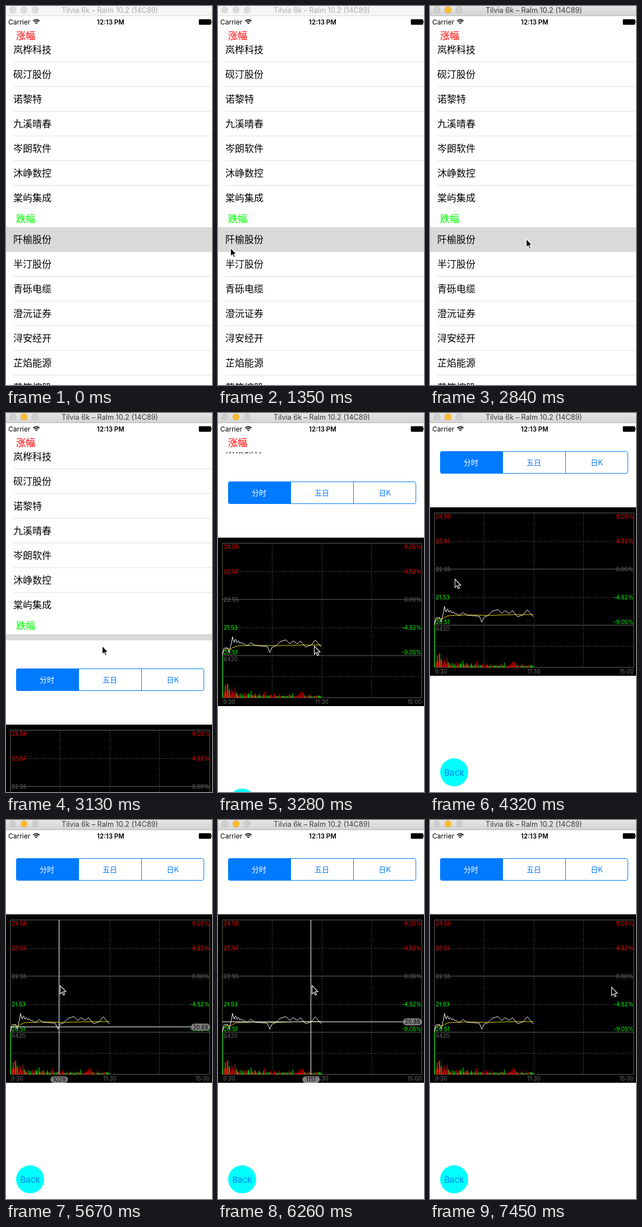
An HTML page with a canvas for the animation above (8 s loop, 367 px wide and 675 px high).

```html
<!DOCTYPE html>
<html lang="zh-CN">
<head>
<meta charset="utf-8">
<title>Stock list</title>
<style>
html, body { margin: 0; width: 100%; height: 100%; overflow: hidden; background: #fff; }
canvas { display: block; width: 367px; height: 675px; }
</style>
</head>
<body>
<canvas id="stage"></canvas>
<script>
const W = 367, H = 675, LOOP = 8000;
const canvas = document.getElementById('stage');
const dpr = window.devicePixelRatio || 1;
canvas.width = W * dpr;
canvas.height = H * dpr;
const ctx = canvas.getContext('2d');

const LATIN = 'Inter, "Liberation Sans", sans-serif';
const CJK = '"Noto Sans CJK SC", "Noto Sans CJK", "Noto Sans CJK JP", sans-serif';
const SMALL = '10px ' + LATIN, ROW = '17px ' + CJK;
const BLUE = '#007aff', RED = '#ff0000', GREEN = '#00ff00', GREY = '#6a6a6a';

const risers = ['岚桦科技', '砚汀股份', '诺黎特', '九溪晴春', '岑朗软件', '沐峥数控', '棠屿集成'];
const fallers = ['阡榆股份', '半汀股份', '青砾电缆', '澄沅证券', '浔安经开', '芷焰能源', '苇笙控股'];

// The screen updates in ticks; tick 0 is the moment the pointer enters.
const TICK = 148.75, FIRST = 1350, SLACK = 6;
const ACTIVE = 10, OPEN = 12, PRESS = 24, RELEASE = 39;
const pointerPath = [
  [0, 22, 430], [6, 171, 414], [16, 171, 414], [20, 44, 295], [25, 44, 295],
  [29, 96, 294], [39, 273, 294], [40, 273, 294], [41, 323, 297]
];

// Turning points of the price line.
const turns = [
  [8, 377], [10, 365], [17, 364], [20, 373], [25, 349], [32, 352], [46, 357], [53, 361],
  [58, 355], [66, 360], [88, 362], [92.5, 373], [95.5, 364], [103, 361], [111, 353],
  [121, 350], [128, 357], [134, 352], [141, 357], [147, 352], [156, 363], [167, 359],
  [173, 350], [183, 362]
];
const MINUTE = 177.5 / 120, LEFT = 8;

function lerp(a, b, k) { return a + (b - a) * k; }

// Linear interpolation of rows [position, value, ...] at p.
function along(rows, p) {
  let i = 0;
  while (i < rows.length - 1 && rows[i + 1][0] <= p) i++;
  const a = rows[i], b = rows[i + 1] || a;
  const k = b === a ? 0 : (p - a[0]) / (b[0] - a[0]);
  return a.slice(1).map((v, j) => lerp(v, b[j + 1], k));
}

function priceAt(x) {
  const d = x - 26;
  const ripple = d > -2 ? 5 * Math.exp(-d / 12) * Math.cos(d * Math.PI * 2 / 5.3) : 0;
  return along(turns, x)[0] - ripple;
}

function rng(seed) {
  return () => (seed = (seed * 16807) % 2147483647) / 2147483647;
}

// One entry per traded minute, with a volume-weighted average price.
function trade() {
  const rand = rng(77);
  let volume = 0, value = 0;
  return Array.from({ length: 120 }, (_, m) => {
    const x = LEFT + m * MINUTE, y = priceAt(x);
    const noise = rand();
    const h = m ? (5 + 21 * Math.exp(-m / 14)) * (0.25 + 0.75 * noise) + 6 * noise ** 8 : 75;
    const weight = m ? h : 8;
    volume += weight;
    value += weight * y;
    return { x, y, h, mean: value / volume, color: m && rand() < 0.55 ? RED : GREEN };
  });
}
const minutes = trade();

function text(str, x, y, font, color, align = 'left') {
  ctx.font = font;
  ctx.fillStyle = color;
  ctx.textAlign = align;
  ctx.fillText(str, x, y);
}

function box(x, y, w, h, color) {
  ctx.fillStyle = color;
  ctx.fillRect(x, y, w, h);
}

function disc(x, y, r, color) {
  ctx.fillStyle = color;
  ctx.beginPath();
  ctx.arc(x, y, r, 0, 7);
  ctx.fill();
}

function path(points, color, width = 1) {
  ctx.strokeStyle = color;
  ctx.lineWidth = width;
  ctx.beginPath();
  points.forEach(([x, y]) => ctx.lineTo(x, y));
  ctx.stroke();
}

function frameBox(x, y, w, h, r, color) {
  ctx.strokeStyle = color;
  ctx.lineWidth = 1;
  ctx.beginPath();
  ctx.roundRect(x + 0.5, y + 0.5, w - 1, h - 1, r);
  ctx.stroke();
}

function pill(x, y, w, h, label) {
  ctx.fillStyle = '#808080';
  ctx.beginPath();
  ctx.roundRect(x, y, w, h, h / 2);
  ctx.fill();
  text(label, x + w / 2, y + h / 2 + 3.7, SMALL, '#000', 'center');
}

function titleBar(active) {
  const g = ctx.createLinearGradient(0, 0, 0, 18);
  g.addColorStop(0, active ? '#e6e6e6' : '#f6f6f6');
  g.addColorStop(1, active ? '#d2d2d2' : '#f4f4f4');
  box(0, 0, W, 18, g);
  box(0, 17, W, 1, active ? '#b8b8b8' : '#dadada');
  [12, 32, 52].forEach((x, i) => {
    const lit = active && i === 1;
    disc(x, 7, 6, lit ? '#e0a123' : active ? '#bcbcbc' : '#d0d0d0');
    disc(x, 7, 5.3, lit ? '#fdbe2e' : active ? '#cecece' : '#dcdcdc');
  });
  text('Tilvia 6k – Ralm 10.2 (14C89)', 185, 12, '12.7px ' + LATIN,
    active ? '#3c3c3c' : '#ababab', 'center');
}

function statusBar() {
  text('Carrier', 4, 32.5, '12px ' + LATIN, '#000');
  ctx.strokeStyle = '#000';
  ctx.lineWidth = 1.7;
  for (const r of [4.6, 7.6]) {
    ctx.beginPath();
    ctx.arc(54, 32, r, -Math.PI * 0.76, -Math.PI * 0.24);
    ctx.stroke();
  }
  ctx.fillStyle = '#000';
  ctx.beginPath();
  ctx.moveTo(54, 32.5);
  ctx.arc(54, 32, 2.4, -Math.PI * 0.78, -Math.PI * 0.22);
  ctx.fill();
  text('12:13 PM', 186.5, 32.5, '600 11.5px ' + LATIN, '#000', 'center');
  frameBox(343, 23, 23, 11, 2, '#8a8a8a');
  box(344, 24, 21, 9, '#000');
  box(366, 26, 1, 4, '#555');
}

function rows(names, top, chosen) {
  names.forEach((name, i) => {
    const y = top + i * 44;
    if (i === chosen) box(0, y, W, 44, '#d9d9d9');
    else if (i < names.length - 1) box(13, y + 43, W - 13, 1, '#e0e0e2');
    text(name, 13, y + 28, ROW, '#000');
  });
}

function list() {
  rows(risers, 56, -1);
  rows(fallers, 394, 0);
  text('涨幅', 18, 59.4, ROW, RED);
  text('跌幅', 18, 385.4, ROW, GREEN);
}

function segments() {
  ctx.save();
  ctx.beginPath();
  ctx.roundRect(18, 68, 335, 40, 4);
  ctx.clip();
  box(18, 68, 112, 40, BLUE);
  box(241, 68, 1, 40, BLUE);
  ctx.restore();
  frameBox(18, 68, 335, 40, 3.5, BLUE);
  ['分时', '五日', '日K'].forEach((s, i) =>
    text(s, 73 + i * 112, 93, '13px ' + CJK, i ? BLUE : '#fff', 'center'));
}

function grid() {
  box(0, 168, W, 300, '#000');
  for (const y of [178, 278, 378, 453]) path([[8, y], [363, y]], '#666');
  for (const x of [8, 363]) path([[x, 178], [x, 453]], '#666');
  ctx.setLineDash([1, 3]);
  for (let i = 1; i < 4; i++) {
    const x = Math.round(LEFT + i * 88.75) - 0.5;
    path([[x, 178], [x, 453]], '#858585');
  }
  for (const y of [228, 328, 415]) path([[8, y + 0.5], [363, y + 0.5]], '#858585');
  ctx.setLineDash([]);
}

function curves() {
  for (const { x, h, color } of minutes) box(x, 453 - h, 1, h, color);
  path(minutes.map(d => [d.x, d.mean]), '#f0e800');
  path(minutes.map(d => [d.x, d.y]), '#fff');
}

function axisLabels() {
  for (let i = 0; i < 5; i++) {
    const color = i < 2 ? RED : i > 2 ? GREEN : GREY;
    const y = [188, 232, 282, 332, 376][i];
    text((24.59 - i * 1.02).toFixed(2), 10, y, SMALL, color);
    text(((2 - i) * 102 / 22.55).toFixed(2) + '%', 362.5, y, SMALL, color, 'right');
  }
  text('6420', 10, 388, SMALL, GREY);
  text('9:30', 9, 464, SMALL, GREY);
  text('11:30', 185, 464, SMALL, GREY, 'center');
  text('15:00', 363, 464, SMALL, GREY, 'right');
}

function crosshair(cx) {
  const m = Math.max(0, Math.min(minutes.length - 1, Math.floor((cx - 9.5) / MINUTE)));
  const { x, y } = minutes[m];
  const clock = 9 * 60 + 31 + m;
  const digits = v => String(v).padStart(2, '0');
  const px = Math.round(x) + 0.5, py = Math.round(y) - 0.5;
  path([[px, 178], [px, 453]], '#fff');
  path([[8, py], [363, py]], '#fff');
  pill(329.5, y - 6.5, 34, 12.5, (20.51 + (378 - y) * 0.0204).toFixed(2));
  pill(x - 14.5, 456.5, 31, 11.5, digits(Math.floor(clock / 60)) + digits(clock % 60));
}

function detail(offset, pressX) {
  ctx.save();
  ctx.translate(0, offset);
  box(0, 18, W, 667, '#fff');
  segments();
  grid();
  curves();
  axisLabels();
  if (pressX !== null) crosshair(pressX);
  disc(43, 640, 25, '#00ffff');
  text('Back', 43, 645.5, '15px ' + LATIN, BLUE, 'center');
  ctx.restore();
}

function pointer([x, y]) {
  const shape = [[0, 0], [0, 15], [3.4, 11.9], [5.6, 17], [8, 16], [5.8, 11], [10.4, 11]];
  ctx.beginPath();
  shape.forEach(([dx, dy]) => ctx.lineTo(x + 0.5 + dx, y + 0.8 + dy));
  ctx.closePath();
  ctx.fillStyle = '#000';
  ctx.fill();
  ctx.strokeStyle = '#fff';
  ctx.lineWidth = 1.1;
  ctx.stroke();
}

// Critically damped slide of the sheet from the bottom edge.
function sheetOffset(n) {
  const wt = 18.26 * (0.0786 + (n - OPEN) * TICK / 1000);
  return Math.round(667 * (1 + wt) * Math.exp(-wt));
}

function draw(t) {
  const n = Math.floor((t - FIRST + SLACK) / TICK);
  const at = n >= 0 ? along(pointerPath, n).map(Math.round) : null;
  ctx.setTransform(dpr, 0, 0, dpr, 0, 0);
  box(0, 0, W, H, '#fff');
  list();
  if (n >= OPEN) detail(sheetOffset(n), n >= PRESS && n < RELEASE ? at[0] : null);
  statusBar();
  titleBar(n >= ACTIVE);
  if (at) pointer(at);
}

function frame() {
  draw(performance.now() % LOOP);
  requestAnimationFrame(frame);
}
frame();
</script>
</body>
</html>
```
